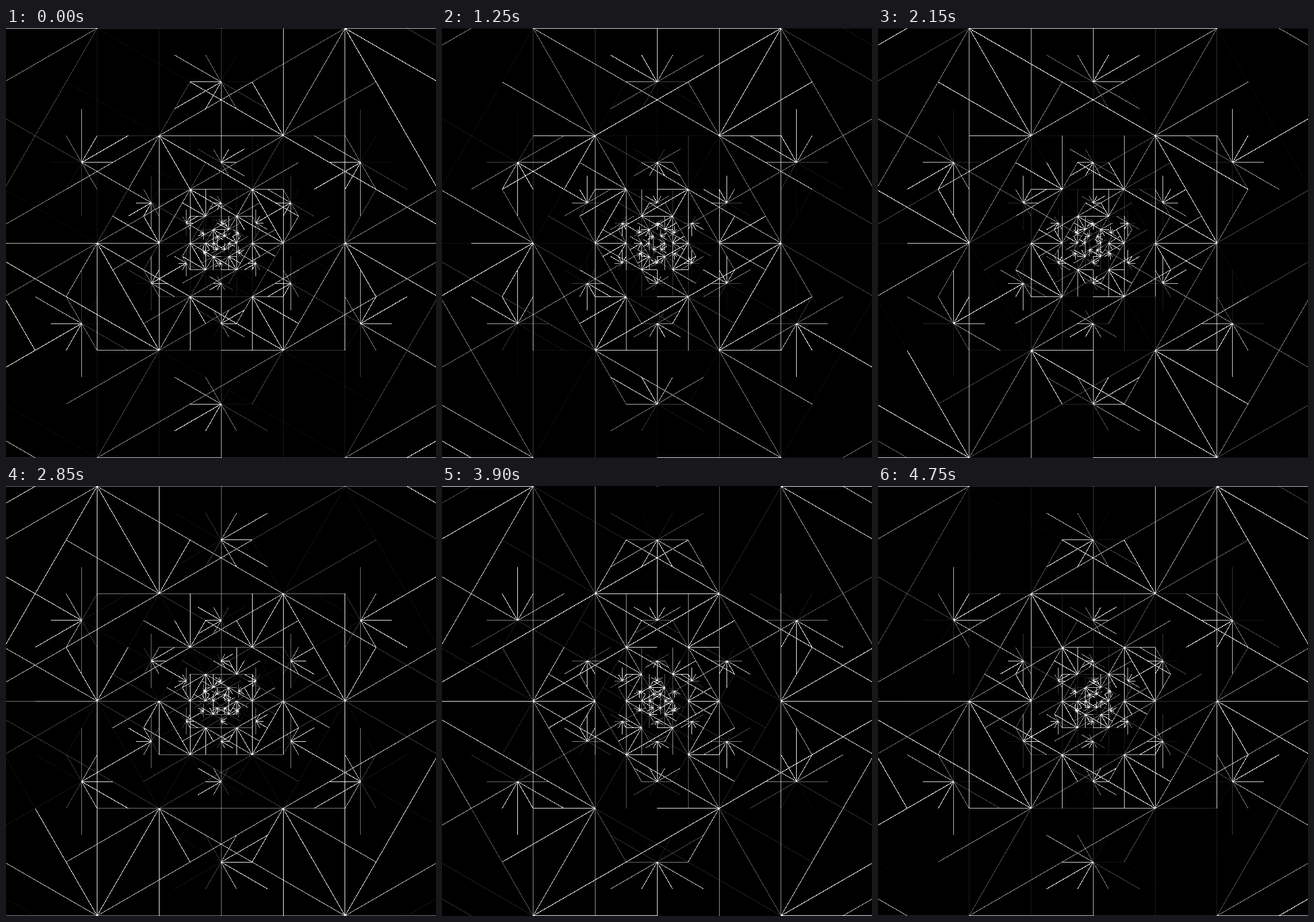
Write an HTML page that moves like this. It is 748 by 748 pixels and loops after 4800 ms.

```html
<!DOCTYPE html>
<html lang="en">
<head>
<meta charset="utf-8">
<title>Hexagonal rays</title>
<style>
  html, body { margin: 0; width: 100%; height: 100%; overflow: hidden; background: #000; }
  svg { display: block; width: 748px; height: 748px; }
  path {
    fill: none;
    stroke: #fff;
    stroke-width: 1;
    shape-rendering: crispEdges;
    animation: glow 4.8s cubic-bezier(.3642, 0, .6358, 1) infinite;
  }
  @keyframes glow {
    from, to { opacity: 1; }
    50% { opacity: 0; }
  }
</style>
</head>
<body>
<svg id="stage" viewBox="0 0 748 748"></svg>
<script>
const LOOP = 4.8, CX = 374.2, CY = 374.03, OUTER = 431.3;

// One entry per ring, halving in size; each letter is a star's starting direction.
const CORNERS = ['BAAABA', 'ABBAAB', 'BAABAA', 'ABBABA', 'BAAAAB', 'ABBAAB'];
const MIDS    = ['AABAAB', 'BAABAA', 'ABBABA', 'AAABAB', 'BABABA'];
const CORNER_START = 54, MID_START = 150;

const rays = new Map();
const point = p => p.map(v => v.toFixed(2)).join(' ');

function polar(x, y, r, deg) {
  const a = deg * Math.PI / 180;
  return [x + r * Math.cos(a), y + r * Math.sin(a)];
}

// Twelve rays; the odd ones are longer by the square root of three.
function addStar(x, y, size, start) {
  for (let i = 0; i < 12; i++) {
    const angle = i * 30;
    const end = polar(x, y, i % 2 ? size * Math.sqrt(3) : size, angle);
    const key = (angle - start + 720) % 360;
    rays.set(key, `${rays.get(key) || ''}M${point([x, y])}L${point(end)}`);
  }
}

function addRing(radius, turn, size, pattern, start) {
  [...pattern].forEach((letter, k) => {
    const [x, y] = polar(CX, CY, radius, k * 60 + turn);
    addStar(x, y, size, start + (letter === 'B' ? 180 : 0));
  });
}

CORNERS.forEach((pattern, i) => {
  const r = OUTER / 2 ** i;
  addRing(r, 0, r / 2, pattern, CORNER_START);
});

MIDS.forEach((pattern, i) => {
  const r = OUTER / 2 ** i;
  addRing(r * Math.sqrt(27) / 4, 30, r / 4, pattern, MID_START);
});

const stage = document.getElementById('stage');
for (const [phase, d] of rays) {
  const path = document.createElementNS('http://www.w3.org/2000/svg', 'path');
  path.setAttribute('d', d);
  path.style.animationDelay = `${(phase / 360 - 1) * LOOP}s`;
  stage.append(path);
}
</script>
</body>
</html>
```
